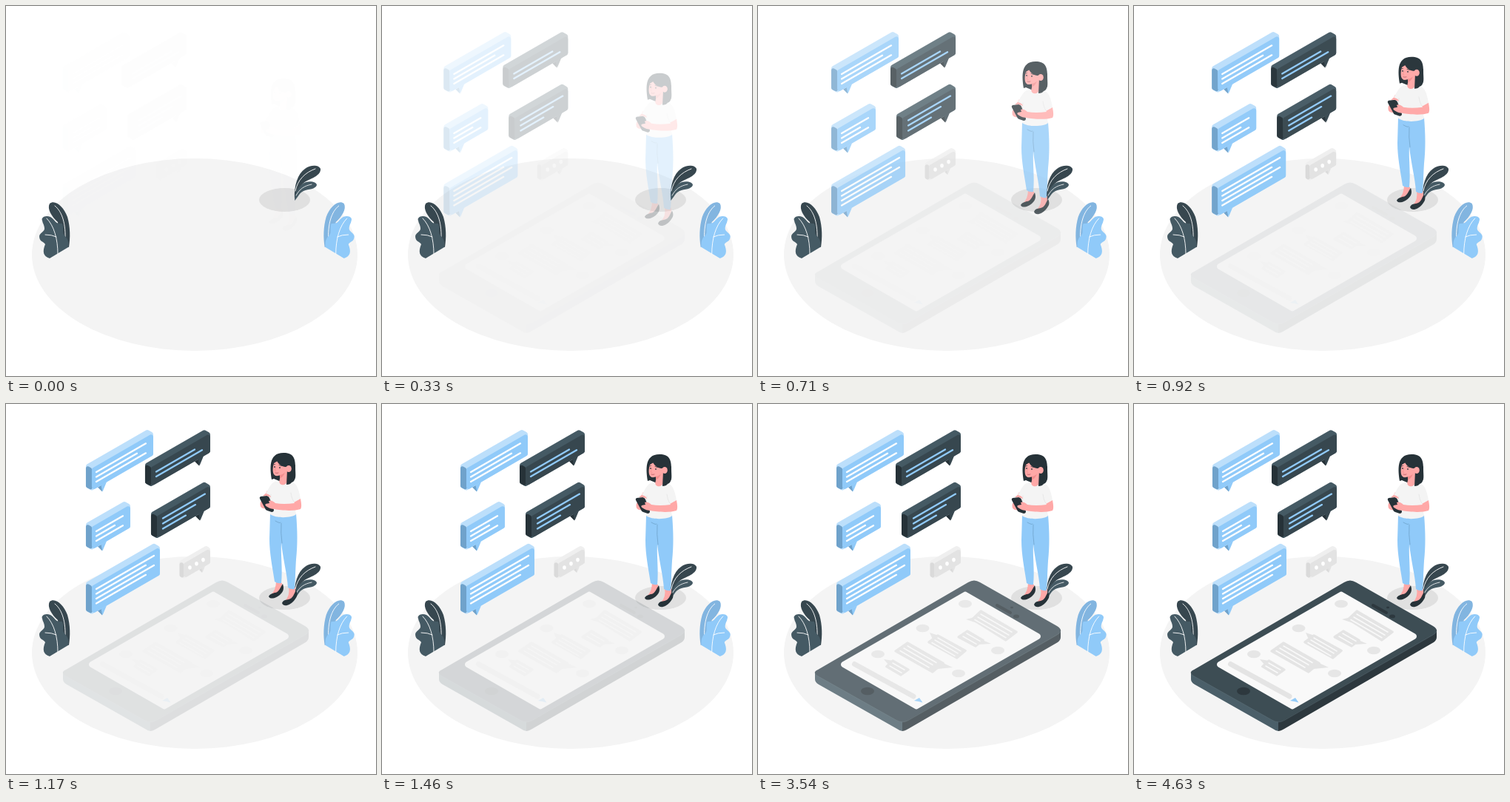
Write an HTML page with a canvas that moves like this. It is 500 by 500 pixels and loops after 4930 ms.

```html
<!DOCTYPE html>
<html lang="en">
<head>
<meta charset="utf-8">
<title>Chat scene</title>
<style>
  html, body { margin: 0; width: 100%; height: 100%; overflow: hidden; background: #fff; }
  canvas { display: block; width: 100vw; height: 100vh; }
</style>
</head>
<body>
<canvas id="stage"></canvas>
<script>
const SIZE = 500, LOOP = 4930, LEAD = 58, SLOPE = 0.577;
const BLUE = '#90caf9', INK = '#263238', SLATE = '#37474f', STEEL = '#455a64', SKIN = '#ffa8a7';
const scale = Math.max(1, window.devicePixelRatio || 1);

const stage = document.getElementById('stage');
const layer = document.createElement('canvas');
stage.width = stage.height = layer.width = layer.height = SIZE * scale;
const out = stage.getContext('2d');
const buf = layer.getContext('2d');
let g = out;

function bezier(x1, y1, x2, y2) {
  const at = (a, b, s) => 3 * a * s * (1 - s) ** 2 + 3 * b * s * s * (1 - s) + s ** 3;
  return x => {
    if (x <= 0) return 0;
    if (x >= 1) return 1;
    let lo = 0, hi = 1;
    for (let i = 0; i < 30; i++) {
      const mid = (lo + hi) / 2;
      if (at(x1, x2, mid) < x) lo = mid; else hi = mid;
    }
    return at(y1, y2, lo);
  };
}
const overshoot = bezier(0.36, -0.01, 0.5, 1.38);
const easeInOut = bezier(0.42, 0, 0.58, 1);

// Drawing helpers
function fill(path, color) {
  g.fillStyle = color;
  g.fill(new Path2D(path));
}

function stroke(path, color, width) {
  g.strokeStyle = color;
  g.lineWidth = width;
  g.lineCap = g.lineJoin = 'round';
  g.stroke(new Path2D(path));
}

function oval(x, y, rx, ry, color) {
  g.fillStyle = color;
  g.beginPath();
  g.ellipse(x, y, rx, ry, 0, 0, Math.PI * 2);
  g.fill();
}

function poly(points, color, r = 0) {
  const n = points.length, [ax, ay] = points[n - 1], [bx, by] = points[0];
  g.fillStyle = color;
  g.beginPath();
  g.moveTo((ax + bx) / 2, (ay + by) / 2);
  points.forEach(([x, y], i) => g.arcTo(x, y, ...points[(i + 1) % n], r));
  g.closePath();
  g.fill();
}

// Scenery
function sidePlant(back, front) {
  fill('M59 267C66 261 78 271 83 285C87 299 87 313 85 326L74 322L70 292C62 285 55 274 59 267Z', back);
  stroke('M66 270C76 278 81 294 80 318', '#fff', 0.9);
  fill('M49 290C47 286 53 282 60 285C67 289 66 295 76 294C79 300 75 306 79 310' +
    'C83 314 85 318 84 326L59 341C50 338 49 332 53 322C51 318 45 319 45 311' +
    'C46 306 52 305 52 301C52 296 50 295 49 290Z', front);
  stroke('M55 287C65 297 70 315 70 335M53 309Q62 309 68 312', '#fff', 0.9);
}

function scenery() {
  oval(255, 336, 220, 130, '#f4f4f4');
  oval(376.5, 262, 34.5, 16, '#e0e0e0');
  fill('M390 261C389 243 394 227 404 220C412 214 423 215 425 220C426 228 414 233 407 236C398 240 395 249 390 261Z', SLATE);
  stroke('M391 250C394 235 404 225 418 220', '#fff', 0.9);
  fill('M390 263C390 251 397 241 405 238C412 236 420 238 420 242C418 248 409 247 402 250C396 253 395 258 390 263Z', STEEL);
  stroke('M392 256C397 247 403 243 413 241', '#fff', 0.8);
  sidePlant(SLATE, STEEL);
  g.save();
  g.translate(515.7, 0);
  g.scale(-1, 1);
  sidePlant('#82b5e0', BLUE);
  g.restore();
}

// Chat bubbles: x, y is the lower left corner of the front face
const blue = { front: BLUE, side: '#6fa2cb', top: '#bcdffb', line: '#fff' };
const dark = { front: SLATE, side: INK, top: STEEL, line: BLUE };
const pale = { front: '#e3e3e3', side: '#dadada', top: '#efefef' };

function bubble(x, y, w, h, c, tail, lines, d = 8) {
  const e = d * SLOPE, rise = w * SLOPE, top = y - h;
  const edge = dx => y - dx * SLOPE;
  const k = d / 8;
  poly([[x + tail, edge(tail)], [x + tail + 6 * k, edge(tail) + 6 * k], [x + tail + 6 * k, edge(tail + 6)]], c.side);
  poly([[x + tail + 4 * k, edge(tail + 4) - 2], [x + tail + 6.5 * k, edge(tail) + 6 * k],
    [x + tail + 13 * k, edge(tail + 13 * k) - 2]], c.front);
  poly([[x - d, top - e], [x + w - d, top - rise - e], [x + w, top - rise],
    [x + w, y - rise], [x, y], [x - d, y - e]], c.top, 3.5);
  poly([[x - d, top - e], [x, top], [x + 1, y], [x - d, y - e]], c.side, 2.5);
  poly([[x, top], [x + w, top - rise], [x + w, y - rise], [x, y]], c.front, 3);
  for (const [dx, dy, len] of lines)
    stroke(`M${x + dx} ${top + dy}l${len} ${-len * SLOPE}`, c.line, 2.3);
}

function bubbles() {
  bubble(114, 117, 83, 30, blue, 8, [[6, 5, 67], [6, 11.5, 55], [6, 18, 67]]);
  bubble(194, 111.5, 80, 26, dark, 59, [[7, 6, 52], [7, 12.5, 62]]);
  bubble(114, 197, 52, 31, blue, 8, [[6, 6, 36], [6, 12.5, 25], [6, 19, 36]]);
  bubble(202, 181.5, 72, 30, dark, 52, [[8, 3, 57], [8, 10, 44], [8, 17, 31]]);
  bubble(114, 284, 92, 38, blue, 8, [[6, 4, 78], [6, 10.5, 67], [6, 17, 78], [6, 23.5, 67]]);
  bubble(238, 236, 36, 20.5, pale, 21, [], 5.5);
  for (let i = 0; i < 3; i++) oval(246.5 + i * 9, 221 - i * 5.2, 2.3, 2.8, '#fff');
}

// Woman
function woman() {
  fill('M365 241L373 244L373 252L362 260L358 260Q365 253 365 241Z', SKIN);
  fill('M382 249L391 250L391 259L382 268L377 268Q384 261 382 249Z', SKIN);
  fill('M355 262C357 258 361 258 363 257C369 257 371 249 374 245C376 251 375 255 371 259C366 264 357 267 355 262Z', INK);
  fill('M373 271C375 266 379 267 382 266C388 265 389 258 392 254C395 260 393 263 389 268C384 274 375 277 373 271Z', INK);
  fill('M357 150L392 150C394 175 394 192 392 212C391 228 391 238 390 252Q385 253 381 250' +
    'C380 232 374 210 372 189C371 206 374 225 372 244Q367 245 363 242C360 222 356 204 356 184Z', BLUE);
  stroke('M364 160Q371 164 371 162M372 163Q371 176 373 190', '#6fa2cb', 0.8);

  fill('M353 119L361 123L354 132L347 130Z', SKIN);
  fill('M359 104C357 90 354 68 375 68C388 68 391 75 391 87C391 98 393 104 387 106L381 111L362 103Z', INK);
  fill('M362 82C360 88 360 96 363 98C365 100 368 99 371 98L369 108C371 114 379 113 380 107L380 94L384 85L370 77Z', SKIN);
  fill('M370 98Q375 97 377 94Q375 101 370 102Z', '#f28f8f');

  fill('M369 106L363 107C358 108 352 122 348 129L357 134L357 151C365 157 387 156 392 151L389 135L398 130' +
    'C396 118 393 109 387 108L380 106C379 113 369 113 369 106Z', '#f4f4f4');
  stroke('M385 122Q386 130 389 134M358 124L357 133', '#e4e4e4', 0.8);

  fill('M380 91L379 111Q384 111 386 108Q391 107 391 97L391 84Z', INK);
  fill('M360 88C361 79 365 80 366 79C370 86 375 87 379 87L381 93L390 86Q389 70 375 69Q359 70 360 88Z', INK);
  oval(382, 89.5, 3.8, 4.5, SKIN);
  oval(363, 87, 0.8, 1.1, INK);
  oval(370, 88, 0.8, 1.1, INK);
  stroke('M361.5 84L363.5 83.5M369 84.5L372 85.5', INK, 0.7);
  stroke('M365 87L363 92L365 92.5', '#f28f8f', 0.7);
  stroke('M364 95Q366 96 368 95', '#b85b62', 0.8);

  fill('M344 134L350 130L359 139L355 144L347 143Q342 141 344 134Z', SKIN);
  fill('M344 127L353 126Q355 127 356 129L362 145Q362 148 359 148L353 146Q351 146 350 143L343 130Q342 128 344 127Z', INK);
  fill('M389 135L398 130C399 136 400 141 398 144C390 147 371 146 363 144Q357 144 353 141' +
    'Q349 139 351 137L356 136L355 133Q359 131 364 136Q375 138 390 136Z', SKIN);
  fill('M347 126L351 123Q357 124 358 128L352 126Z', SKIN);
}

// Tablet
function message(corners, tail, lines) {
  const tone = '#e4e4e4';
  poly(corners, tone, 1.5);
  poly(tail, tone);
  for (const [x, y, len] of lines) stroke(`M${x} ${y}l${len} ${len * SLOPE}`, '#fafafa', 1.5);
}

function tablet() {
  fill('M77 364L77 372Q77 376 82 379L188 439Q192 442 195 442L199 427Z', STEEL);
  fill('M195 428L195 442Q198 442 203 439L405 322Q409 319 409 315L409 305Z', INK);
  fill('M81 359L284 241Q292 236 300 241L404 300Q414 306 404 312L203 427Q195 432 187 427L82 368Q72 363 81 359Z', SLATE);
  stroke('M78 366Q79 367 82 368.5L187 427.5Q195 432 203 427.5L404 312Q408 310 409 307', '#53656e', 0.6);
  poly([[108, 352], [280, 253], [386, 314], [214, 413]], '#fafafa', 4);
  oval(148, 388, 9, 5.2, INK);
  stroke('M323 272L341 282', INK, 4);
  oval(343, 275, 2, 1.3, INK);
  oval(349, 287, 4, 2.5, INK);

  for (const [x, y] of [[280, 270], [222.5, 303], [162, 338], [324, 333], [271, 364]])
    oval(x, y, 9, 5.2, '#e6e6e6');
  stroke('M130.5 351.5L210 395', '#e4e4e4', 7);
  poly([[211, 401], [218, 397], [222.5, 403.5], [217, 402]], BLUE);

  message([[287, 291], [301, 278], [352, 308], [335, 321]],
    [[281, 291], [293, 288], [296, 296]], [[301, 284, 42], [297, 288, 42], [293, 291.5, 42]]);
  message([[228, 322], [243, 311], [283, 333], [269, 345]],
    [[232, 309], [244, 313], [236, 318]], [[243, 316, 31], [239, 319, 31], [235, 322.5, 31]]);
  message([[268, 315], [283, 305], [307, 319], [294, 329]],
    [[301, 318], [315, 324], [299, 325]], [[282, 310, 18], [277, 314, 18]]);
  message([[183, 334], [202, 321], [253, 350], [236, 364]],
    [[246, 348], [263, 356], [243, 358]], [[202, 327, 39], [197, 330, 39], [192, 333.5, 39]]);
  message([[171, 355], [182, 345], [206, 359], [193, 368]],
    [[170, 345], [183, 347], [176, 352]], [[182, 350, 16], [178, 354, 16]]);
}

// Draw a group as one sheet, shifted and faded
function sheet(draw, alpha, dx = 0, dy = 0) {
  if (alpha <= 0) return;
  g = buf;
  buf.setTransform(1, 0, 0, 1, 0, 0);
  buf.clearRect(0, 0, layer.width, layer.height);
  buf.setTransform(scale, 0, 0, scale, dx * scale, dy * scale);
  draw();
  out.setTransform(1, 0, 0, 1, 0, 0);
  out.globalAlpha = Math.min(1, alpha);
  out.drawImage(layer, 0, 0);
  out.globalAlpha = 1;
}

function render(time) {
  const t = time + LEAD;
  const enter = overshoot(t / 1500);
  const offset = 30 * (1 - enter);
  g = out;
  out.setTransform(scale, 0, 0, scale, 0, 0);
  out.fillStyle = '#fff';
  out.fillRect(0, 0, SIZE, SIZE);
  scenery();
  sheet(tablet, easeInOut(t / 5400));
  sheet(bubbles, enter, -offset, 0);
  sheet(woman, enter, 0, offset);
}

const start = performance.now();
function tick() {
  render((performance.now() - start) % LOOP);
  requestAnimationFrame(tick);
}
tick();
</script>
</body>
</html>
```
